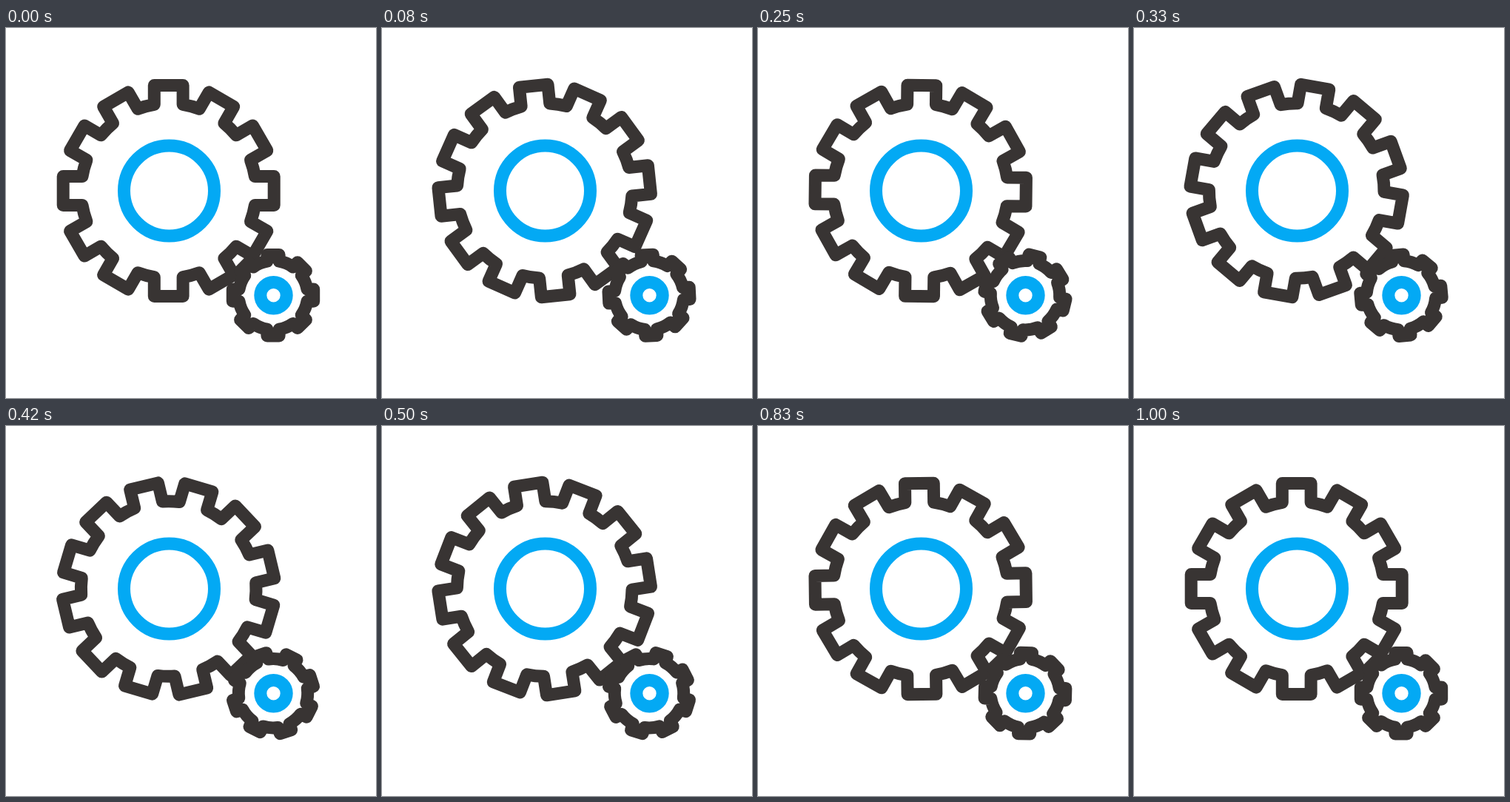
These frames come from a looping animation (500 by 500 pixels, 1.04 s). An HTML page:

```html
<!DOCTYPE html>
<html>
<head>
<meta charset="utf-8">
<title>Turning gears</title>
<style>
  html, body { margin: 0; width: 100%; height: 100%; overflow: hidden; background: #fff; }
  svg { display: block; width: 100vw; height: 100vh; }
  path, circle { fill: none; stroke-width: 17; stroke-linejoin: round; }
  path { stroke: #383433; }
  circle { stroke: #03a9f4; }
</style>
</head>
<body>
<svg viewBox="0 0 500 500">
  <g transform="translate(219.7 220)"><path id="big"/><circle cx=".8" r="61"/></g>
  <g transform="translate(361 361.2)"><path id="small"/><circle cx=".5" cy=".1" r="17.7"/></g>
</svg>
<script>
const LOOP = 1040, FRAME = 1000 / 24, LAST = 24;
const big = document.getElementById('big');
const small = document.getElementById('small');

// Straight-sided teeth joined by arcs along the root circle.
function gear(teeth, half, root, tip) {
  const rootRadius = Math.hypot(half, root);
  let d = '';
  for (let i = 0; i < teeth; i++) {
    const a = i * 2 * Math.PI / teeth, c = Math.cos(a), s = Math.sin(a);
    const at = (x, r) => `${(x * c + r * s).toFixed(2)} ${(x * s - r * c).toFixed(2)}`;
    const start = i ? `A${rootRadius} ${rootRadius} 0 0 1 ` : 'M';
    d += `${start}${at(-half, root)}L${at(-half, tip)}L${at(half, tip)}L${at(half, root)}`;
  }
  return `${d}A${rootRadius} ${rootRadius} 0 0 1 ${-half} ${-root}Z`;
}

// Fast start, long slow finish: cubic-bezier(.167, .465, .167, 1).
function ease(t) {
  const curve = (s, p, q) => 3 * (1 - s) ** 2 * s * p + 3 * (1 - s) * s * s * q + s ** 3;
  let lo = 0, hi = 1;
  for (let i = 0; i < 30; i++) {
    const mid = (lo + hi) / 2;
    if (curve(mid, .167, .167) < t) lo = mid; else hi = mid;
  }
  return curve(hi, .465, 1);
}

function draw() {
  // 24 steps per second, with step times rounded to 10 ms.
  const time = Math.floor(performance.now() % LOOP / 10) * 10;
  const step = Math.min(LAST, Math.floor((time + 4.9) / FRAME));
  const turn = ease(step / LAST);
  big.setAttribute('transform', `rotate(${90 * turn})`);
  small.setAttribute('transform', `rotate(${-180 * turn})`);
  requestAnimationFrame(draw);
}

big.setAttribute('d', gear(12, 19.4, 116.7, 142.5));
small.setAttribute('d', gear(8, 8.1, 46, 54.7));
draw();
</script>
</body>
</html>
```
